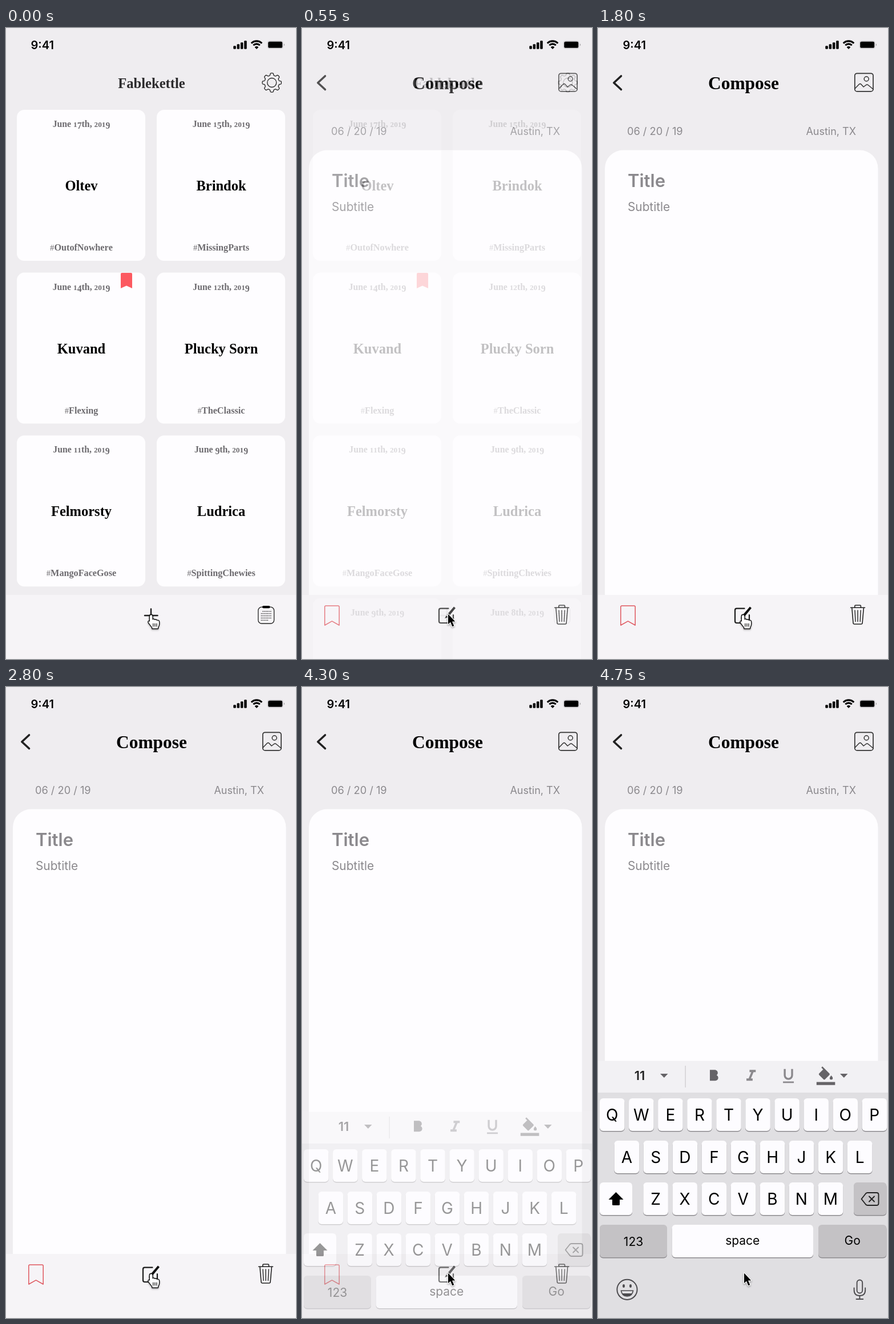
Animation, 508 px wide and 1103 px high, one loop 5650 ms. Source, as an HTML page with a canvas:

```html
<!DOCTYPE html>
<html lang="en">
<head>
<meta charset="utf-8">
<title>Journal</title>
<style>
  html, body { margin: 0; width: 100%; height: 100%; overflow: hidden; background: #efedf0; }
  #stage { position: fixed; inset: 0; overflow: hidden; contain: strict; }
  canvas { position: absolute; left: 0; top: 0; width: 508px; height: 1103px; }
</style>
</head>
<body>
<div id="stage"></div>
<script>
const W = 508, H = 1103, LOOP = 5650, TICK = 50;
const PAGE = '#efedf0', WHITE = '#fefdff', BAR = '#f6f4f7', GREY = '#8b898d';
const SANS = 'Inter, "Open Sans", sans-serif';
const SERIF = '"Liberation Serif", "Times New Roman", serif';
const stage = document.getElementById('stage');
let c;

function layer(draw) {
  const el = document.createElement('canvas');
  const k = window.devicePixelRatio || 1;
  el.width = W * k;
  el.height = H * k;
  c = el.getContext('2d');
  c.scale(k, k);
  c.lineCap = c.lineJoin = 'round';
  draw();
  stage.appendChild(el);
  return el;
}

function rect(x, y, w, h, color) {
  c.fillStyle = color;
  c.fillRect(x, y, w, h);
}

function box(x, y, w, h, r) {
  c.beginPath();
  c.roundRect(x, y, w, h, r);
}

function fill(color) {
  c.fillStyle = color;
  c.fill();
}

function stroke(color, width) {
  c.strokeStyle = color;
  c.lineWidth = width;
  c.stroke();
}

function path(d, color, width) {
  const p = new Path2D(d);
  if (width) {
    c.strokeStyle = color;
    c.lineWidth = width;
    c.stroke(p);
  } else {
    c.fillStyle = color;
    c.fill(p);
  }
}

// Path on a 24-unit grid, scaled to the toolbar.
function icon(x, y, d, color) {
  c.save();
  c.translate(x, y);
  c.scale(1.355, 1.355);
  path(d, color);
  c.restore();
}

function circle(x, y, r) {
  c.beginPath();
  c.arc(x, y, r, 0, Math.PI * 2);
}

function text(str, x, y, font, color, align = 'center') {
  c.font = font;
  c.fillStyle = color;
  c.textAlign = align;
  c.fillText(str, x, y);
}

// Centred serif line with old-style figures and a light hash sign.
function caption(str, x, y, size, color) {
  const runs = [...str].map(ch => {
    const small = '012'.includes(ch);
    const weight = ch === '#' ? 400 : 700;
    const px = small ? size * 0.84 : ch === '#' ? size * 0.9 : size;
    const font = `${weight} ${px}px ${SERIF}`;
    c.font = font;
    return { ch, font, w: c.measureText(ch).width, dy: '34579'.includes(ch) ? size * 0.2 : 0 };
  });
  x -= runs.reduce((sum, r) => sum + r.w, 0) / 2;
  for (const r of runs) {
    text(r.ch, x, y + r.dy, r.font, color, 'left');
    x += r.w;
  }
}

function card(x, y, date, title, tag) {
  box(x, y, 225, 264, 13);
  fill(WHITE);
  const mid = x + 113;
  caption(`June ${date}th, 2019`, mid, y + 30, 15.8, '#6d6b6f');
  text(title, mid, y + 141, `700 24.5px ${SERIF}`, '#000');
  caption(tag, mid, y + 246, 16.2, '#6d6b6f');
}

function gear(x, y) {
  c.beginPath();
  for (let i = 0; i <= 240; i++) {
    const a = i / 240 * Math.PI * 2;
    const r = 14.8 + 1.9 * Math.tanh(2.5 * Math.cos(8 * a));
    c.lineTo(x + r * Math.cos(a), y + r * Math.sin(a));
  }
  c.closePath();
  stroke('#222', 1.3);
  circle(x, y, 8);
  stroke('#222', 1.3);
}

function drawGrid() {
  rect(0, 0, W, H, PAGE);
  text('Fablekettle', 255, 105, `700 24.6px ${SERIF}`, '#2c2b2d');
  gear(465.7, 95.5);
  const cards = [
    ['17', 'Oltev', '#OutofNowhere'], ['15', 'Brindok', '#MissingParts'],
    ['14', 'Kuvand', '#Flexing'], ['12', 'Plucky Sorn', '#TheClassic'],
    ['11', 'Felmorsty', '#MangoFaceGose'], ['9', 'Ludrica', '#SpittingChewies'],
    ['9', '', ''], ['8', '', '']
  ];
  cards.forEach((d, i) => card(i % 2 ? 264 : 19, 143 + 284.6 * (i >> 1), ...d));
  path('M201 430q0-2 2-2h16q2 0 2 2v25l-10-4.6-10 4.6z', '#fc5960');
}

function drawGridBar() {
  rect(0, 991, W, 112, BAR);
  path('M243 1027H265.5M254 1015.5V1039', '#222', 2.5);
  box(441.8, 1012.2, 27.8, 28.8, 6);
  stroke('#222', 1.3);
  box(449, 1010, 13.5, 4.2, 2);
  fill('#000');
  for (let row = 0; row < 5; row++)
    for (let i = 0; i < (row === 4 ? 5 : 7); i++)
      if (row || i) rect(446.8 + i * 2.7, 1019 + row * 3.9, 1.4, 1.4, '#222');
}

function drawCompose() {
  rect(0, 0, W, H, PAGE);
  path('M40.5 84L27.8 95.7L40.5 107.5', '#222', 3.6);
  text('Compose', 255, 107, `700 31.4px ${SERIF}`, '#000');
  box(449.8, 79.3, 32.2, 31.6, 4);
  stroke('#333', 1.7);
  circle(470.2, 89, 4);
  stroke('#333', 1.5);
  path('M450 106L457.5 98.2Q459.3 96.5 461 98.4L465.2 103L469 100Q471.4 98.2 473.6 100L482 107', '#333', 1.5);
  text('06 / 20 / 19', 51, 187, `400 18.2px ${SANS}`, GREY, 'left');
  text('Austin, TX', 452, 187, `400 18px ${SANS}`, GREY, 'right');
  box(12, 213.5, 478.5, 800, [32, 32, 0, 0]);
  fill(WHITE);
  text('Title', 52, 278, `600 31px ${SANS}`, GREY, 'left');
  text('Subtitle', 52, 320, `400 20.8px ${SANS}`, GREY, 'left');

  rect(0, 991, W, 112, BAR);
  path('M39.8 1012q0-2 2-2H63.2q2 0 2 2V1044L52.5 1036.8L39.8 1044z', '#df575f', 1.5);
  path('M256.5 1014.7H243Q240 1014.7 240 1017.7V1037Q240 1040 243 1040H262Q265 1040 265 1037V1026', '#1c1c1c', 2.2);
  path('M254 1025.5L266 1011.5L269 1014L257.5 1028zM252.7 1027.2L256 1029.8L250 1032z', '#111');
  path('M442.5 1013.2H467.5M449.8 1013V1010.6Q449.8 1009 451.4 1009H458.8Q460.4 1009 460.4 1010.6V1013', '#222', 1.6);
  path('M444.8 1013.5L447 1040Q447.2 1042 449.2 1042H460.9Q462.9 1042 463.1 1040L465.4 1013.5', '#222', 1.6);
  path('M450 1018L451 1037.5M455 1018V1037.5M460.2 1018L459.2 1037.5', '#222', 1.4);
}

function key(x, y, w, label, size, color = '#fdfcff', dy = 0) {
  box(x, y + 1.4, w, 57, 6);
  fill('#8d8b8f');
  box(x, y, w, 57, 6);
  fill(color);
  text(label, x + w / 2, y + 28.5 + size * 0.364 + dy, `400 ${size}px ${SANS}`, '#000');
}

function keyRow(letters, x, y) {
  [...letters].forEach((ch, i) => key(x + i * 51.05, y, 43.6, ch, 28));
}

function drawKeys() {
  const ink = '#656367', dark = '#c4c2c5';
  rect(0, 653.5, W, 56, '#f2f1f4');
  rect(0, 709, W, H - 709, '#e0dfe2');
  text('11', 73, 687, `600 22px ${SANS}`, '#222');
  rect(152.5, 662, 1.2, 38, '#cac8cb');
  for (const x of [109, 424]) path(`M${x} 676h13.5l-6.7 7z`, ink);
  icon(186.5, 663.8, 'M15.6 10.8C16.6 10.1 17.2 9 17.2 8C17.2 5.7 15.5 4 13.2 4H7V18H14C16.1 18 17.8 16.3 17.8 14.2C17.8 12.7 16.9 11.4 15.6 10.8zM10 6.5V9.5H13A1.5 1.5 0 0 0 13 6.5zM13.5 15.5A1.5 1.5 0 0 0 13.5 12.5H10V15.5z', ink);
  icon(251.9, 663.8, 'M10 4V7H12.2L8.8 15H6V18H14V15H11.8L15.2 7H18V4z', GREY);
  icon(317.3, 663.8, 'M12 17A6 6 0 0 0 18 11V3H15.5V11A3.5 3.5 0 0 1 8.5 11V3H6V11A6 6 0 0 0 12 17zM5 19V21H19V19z', GREY);
  icon(382.8, 663.3, 'M16.6 9L7.6 0L6.2 1.4L8.6 3.8L3.4 9Q2.4 10 3.4 11L9 16.6Q10 17.5 11 16.6L16.6 11Q17.6 10 16.6 9zM5.2 10H14.8L10 5.2zM19 11.5Q17 13.7 17 15A2 2 0 0 0 21 15Q21 13.7 19 11.5zM0 20H24V24H0z', ink);

  keyRow('QWERTYUIOP', 3, 719);
  keyRow('ASDFGHJKL', 28.5, 793);
  keyRow('ZXCVBNM', 79.3, 866);
  key(3, 866, 57, '', 20);
  key(448, 866, 57.5, '', 20, dark);
  key(3, 940, 118, '123', 21, dark, 0.5);
  key(129.5, 940, 247.5, 'space', 21, undefined, -1.5);
  key(386, 940, 119.5, 'Go', 21, dark, -1.5);
  path('M31.5 883L44.5 896H38V904.5Q38 906 36.5 906H26.5Q25 906 25 904.5V896H18.5z', '#000');
  path('M461.5 895L469 885.5Q470.4 884 472 884H488Q491.5 884 491.5 887.5V902.5Q491.5 906 488 906H472Q470.4 906 469 904.5z', '#222', 1.9);
  path('M475 890.5L484 899.5M484 890.5L475 899.5', '#222', 1.9);

  // smiley
  circle(51, 1053.3, 17.6);
  stroke('#4c4b4e', 2);
  for (const x of [45, 57]) {
    c.beginPath();
    c.ellipse(x, 1047, 2, 2.9, 0, 0, Math.PI * 2);
    fill('#4c4b4e');
  }
  path('M39.5 1054.5H62.5Q61 1065.8 51 1065.8T39.5 1054.5z', '#4c4b4e');
  path('M41.5 1056H60.5Q60 1058.5 58.8 1060H43.2Q42 1058.5 41.5 1056z', '#e0dfe2');

  // microphone
  box(453.6, 1036.5, 9.6, 23, 4.8);
  stroke('#4c4b4e', 1.9);
  path('M448.6 1050.5V1054Q448.6 1064 458.4 1064T468.2 1054V1050.5M458.4 1064V1070M452.5 1070H464.3', '#4c4b4e', 1.9);
}

function drawStatus() {
  text('9:41', 63.7, 36.8, `600 20px ${SANS}`, '#000');
  for (let i = 0; i < 4; i++) {
    const h = 5.5 + i * 3;
    box(398.3 + i * 6.3, 36.7 - h, 4.5, h, 1.2);
    fill('#000');
  }
  c.lineCap = 'butt';
  for (const r of [13.1, 8.1]) {
    c.beginPath();
    c.arc(439, 36, r, -Math.PI * 0.75, -Math.PI * 0.25);
    stroke('#000', 3.1);
  }
  path('M439 37L435.6 33.4Q439 30.6 442.4 33.4z', '#000');
  box(458, 22.5, 27.5, 13.5, 3.8);
  stroke('#cfcdd1', 1);
  box(459.2, 23.8, 25, 11, 2.6);
  fill('#000');
  path('M487 27.3Q489.3 29.3 487 31.5z', '#99979b');
}

function shape(d, inside, edge, width) {
  c.save();
  c.shadowColor = 'rgba(0,0,0,.35)';
  c.shadowBlur = 3;
  c.shadowOffsetY = 1.5;
  path(d, edge, width);
  c.restore();
  path(d, inside);
}

function drawHand() {
  shape('M252 1038V1028.5Q252 1026 254.2 1026T256.4 1028.5V1034.5Q258.5 1032.6 260.4 1035Q262.6 1033.6 264.4 1036Q268 1035 268 1038.5V1042Q268 1044.5 266 1047.5V1049.5H256.3V1047.5Q253.5 1044.5 251.5 1041.5Q249 1038.5 249.7 1037.5Q250.7 1036.5 252 1038z',
    '#fff', '#111', 2.8);
  path('M257.8 1041V1046M260.9 1041V1046M264 1041V1046', '#111', 1.2);
}

function drawArrow() {
  shape('M256 1024.5V1042.3L260 1038.6L263.3 1046.2L266.3 1044.9L263 1037.5H268.3z', '#000', '#fff', 2.4);
}

layer(drawGrid);
const gridBar = layer(drawGridBar);
const compose = layer(drawCompose);
const keys = layer(drawKeys);
layer(drawStatus);
const hand = layer(drawHand);
const arrow = layer(drawArrow);

const clamp = v => Math.min(1, Math.max(0, v));

function rise(t) {
  if (t < 4250) return 0;
  if (t >= 4550) return 1;
  return 1 / (1 + Math.exp((4308 - t) / 19.6));
}

function render(t) {
  const fade = clamp((t - 225) / 425);
  gridBar.style.opacity = 1 - fade;
  compose.style.opacity = fade;

  const up = rise(t);
  keys.style.opacity = up;
  keys.style.transform = `translateY(${Math.round((1 - up) * 148)}px)`;

  const pointing = t < 200 || (t >= 800 && t < 3750);
  hand.style.opacity = pointing ? 1 : 0;
  arrow.style.opacity = pointing ? 0 : 1;
}

const start = performance.now();
function frame() {
  const t = (performance.now() - start) % LOOP;
  render(Math.floor(t / TICK) * TICK);
  requestAnimationFrame(frame);
}
frame();
</script>
</body>
</html>
```
